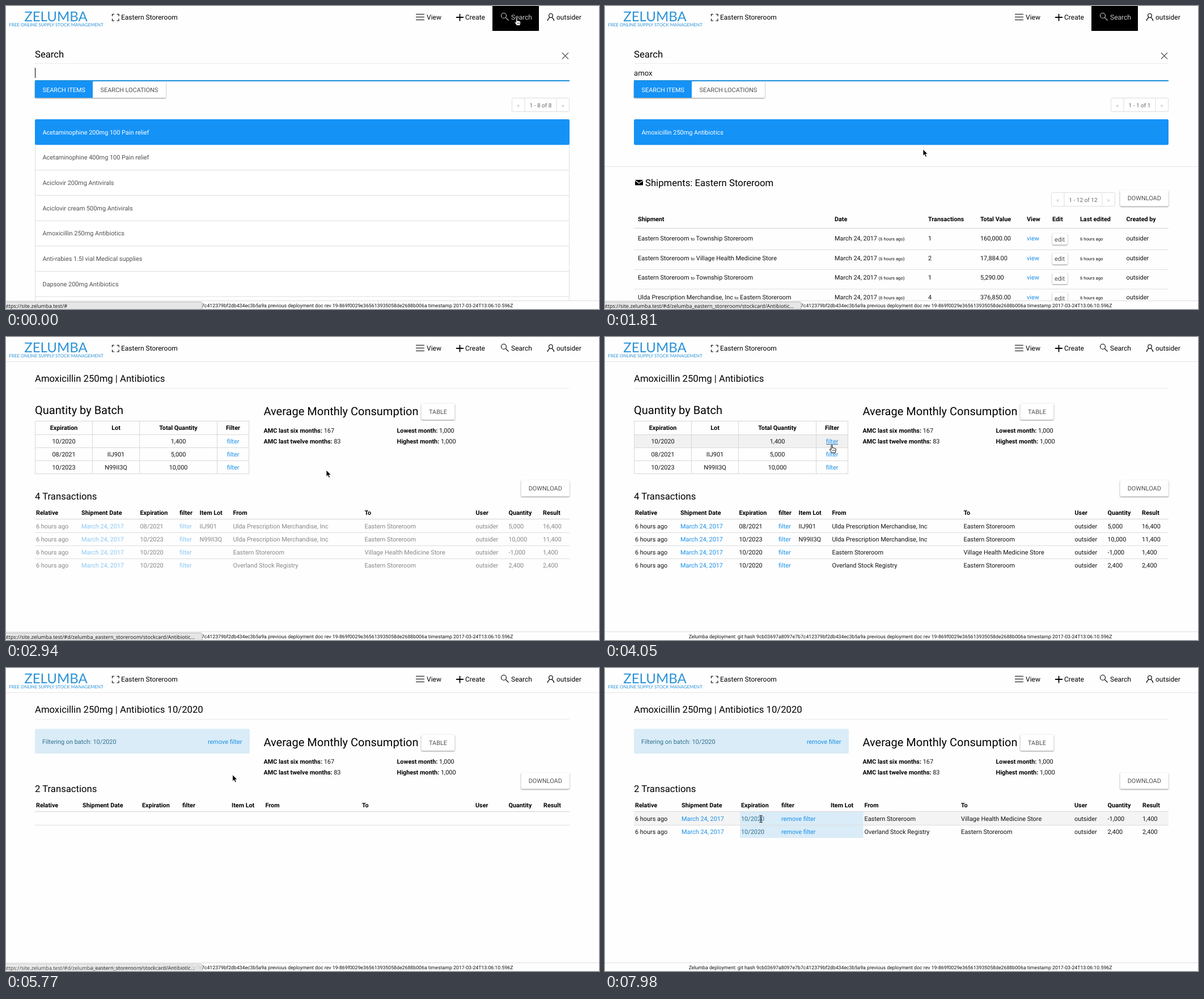
An HTML page that plays this animation: 1046x535 px, repeating every 8 s.

```html
<!DOCTYPE html>
<html lang="en">
<head>
<meta charset="utf-8">
<title>Stock search</title>
<style>
html, body { margin: 0; width: 100%; height: 100%; overflow: hidden; background: #fefefe; }
svg { display: block; font: 10.9px Roboto, sans-serif; fill: #111; text-rendering: geometricPrecision; }
text { white-space: pre; }
.b { font-weight: 700; font-size: 10.8px; fill: #000; }
.nav { font-size: 12px; fill: currentColor; }
.h2 { font-size: 16.7px; fill: #000; }
.h1 { font-size: 20px; fill: #000; }
.s { font-size: 7.7px; }
.page { font-size: 10.1px; fill: #666; }
.link { fill: #1a90e8; }
.grey { fill: #505050; }
.white { fill: #fff; }
.info { fill: #31708f; }
.mid { text-anchor: middle; }
.btn { fill: #fff; filter: drop-shadow(.5px 1px 1.2px rgba(0, 0, 0, .45)); }
.icon { fill: none; stroke: currentColor; stroke-width: 1.15; }
</style>
</head>
<body>
<svg id="stage" width="1046" height="535" viewBox="0 0 1046 535"></svg>
<script>
const BLUE = '#1592f6', STORE = 'Eastern Storeroom', USER = 'outsider';
const CLINIC = 'Village Health Medicine Store', VENDOR = 'Ulda Prescription Merchandise, Inc';
const URL_SHORT = 'https://site.zelumba.test/#';
const URL_LONG = URL_SHORT + 'd/zelumba_eastern_storeroom/stockcard/Antibiotic...';

const text = (x, y, s, cls = '') => `<text x="${x}" y="${y}" class="${cls}">${s}</text>`;
const rect = (x, y, w, h, fill, more = '') =>
  `<rect x="${x}" y="${y}" width="${w}" height="${h}" fill="${fill}" ${more}/>`;
const path = (d, stroke, width = 1) => `<path d="${d}" fill="none" stroke="${stroke}" stroke-width="${width}"/>`;
const hline = (y, color = '#ddd', x0 = 51, x1 = 994, w = 1) => path(`M${x0} ${y}H${x1}`, color, w);
const icon = d => `<path class="icon" d="${d}"/>`;
const group = (id, ...parts) => `<g id="${id}">${parts.join('')}</g>`;
const cells = (xs, y, values, cls = '') => values.map((v, i) => text(xs[i], y, v, cls)).join('');
const link = s => `<tspan class="link">${s}</tspan>`;
const small = s => `<tspan class="s">${s}</tspan>`;
const button = (x, y, w, label) =>
  `<rect class="btn" x="${x}" y="${y}" width="${w}" height="28.5" rx="2"/>` + text(x + w / 2, y + 18.4, label, 'grey mid');

function pager(x, y, inner, label) {
  const a = x + 22.5, b = a + inner;
  return rect(x, y, inner + 45, 24, '#fff', 'stroke="#ddd" rx="2"') + path(`M${a} ${y}v24M${b} ${y}v24`, '#ddd') +
    text(x + 11, y + 16, '«', 'page mid" opacity=".5') + text((a + b) / 2, y + 16.5, label, 'page mid') +
    text(b + 11, y + 16, '»', 'page mid" opacity=".5');
}

function header() {
  return text(88, 27, 'ZELUMBA', 'mid" style="font:24px Lato,sans-serif;fill:#2b93d8') +
    text(88.5, 36, 'FREE ONLINE SUPPLY STOCK MANAGEMENT', 'mid" style="font:7.95px Lato,sans-serif;fill:#2b93d8') +
    icon('M187.5 18V14.5H191M195.5 14.5H199V18M199 22.5V26H195.5M191 26H187.5V22.5') + text(203, 24, STORE, 'nav') +
    icon('M723 14.5H738M723 19.5H738M723 24.5H738') + text(742, 24, 'View', 'nav') +
    path('M800.5 14V26.5M794 20H807', '#000', 1.8) + text(810, 24, 'Create', 'nav') +
    rect(858, 0, 82, 44, '#000', 'id="active"') +
    group('search', icon('M882.5 17a4.5 4.5 0 1 0 -9 0a4.5 4.5 0 1 0 9 0M881.2 20.3L886.5 25.5'),
      text(891, 24, 'Search', 'nav')) +
    icon('M964.3 17a3.3 3.5 0 1 0 -6.6 0a3.3 3.5 0 1 0 6.6 0M955.3 26.3C955.3 22.5 958 21.2 959.3 20.2M962.7 20.2C964 21.2 966.7 22.5 966.7 26.3') +
    text(971, 24, USER, 'nav');
}

function dialog() {
  return text(51, 90.5, 'Search', 'h2') + path('M981 82.5L992 93.5M992 82.5L981 93.5', '#666', 1.5) +
    hline(101.5, '#eaeaea') + text(51, 123, '', '" id="typed" style="font-size:13.2px') +
    rect(51, 109, 1, 18, '#000', 'id="caret"') +
    `<rect class="btn" x="51" y="133" width="231" height="29" rx="2"/>` + rect(51, 133, 102, 29, BLUE) +
    hline(132, '#1a8fdc', 51, 994, 2) +
    text(64.5, 151.5, 'SEARCH ITEMS', 'white') + text(166.5, 151.5, 'SEARCH LOCATIONS', 'grey');
}

function itemList(names) {
  const step = 44.65;
  return rect(51.5, 200.5, 942, step * names.length, '#fff', 'stroke="#ddd" rx="3"') +
    rect(51, 200, 943, 45.3, BLUE, 'rx="2.5"') +
    names.map((n, i) => (i ? hline(245.2 + step * i, '#ddd') : '') +
      text(64.5, 226.8 + step * i, n, i ? 'grey' : 'white')).join('');
}

function shipments() {
  const xs = [58, 405, 570, 662, 744, 789, 838, 919.5];
  const to = (a, b) => `${a} ${small('to')} ${b}`;
  const rows = [[to(STORE, 'Township Storeroom'), 1, '160,000.00'], [to(STORE, CLINIC), 2, '17,884.00'],
    [to(STORE, 'Township Storeroom'), 1, '5,290.00'], [to(VENDOR, STORE), 4, '376,850.00']];
  return hline(283.5, '#e6e6e6', 0, 1046) + rect(53, 307, 14, 9.5, '#000', 'rx="1"') +
    path('M53 308L60 313L67 308', '#fff', 1.2) + text(71, 318, 'Shipments: ' + STORE, 'h2') +
    pager(787.5, 329.5, 67, '1 - 12 of 12') + button(908.5, 325, 85.5, 'DOWNLOAD') +
    cells(xs, 380, ['Shipment', 'Date', 'Transactions', 'Total Value', 'View', 'Edit', 'Last edited', 'Created by'], 'b') +
    hline(392.5, '#ddd', 51, 994, 1.5) +
    rows.map(([what, count, value], i) => {
      const y = 414 + 34.7 * i;
      return cells(xs, y, [what, 'March 24, 2017 ' + small('(6 hours ago)'), count, value, link('view'), '',
        small('6 hours ago'), USER]) + hline(y + 16.5) +
        `<rect class="btn" x="789" y="${y - 12.5}" width="27" height="20" rx="2"/>` + text(802, y + 1.5, 'edit', 'grey mid');
    }).join('');
}

function consumption() {
  const fact = (x, y, label, value) => text(x, y, `<tspan class="b">${label}:</tspan> ${value}`);
  return hline(43.5, '#e4e4e4', 0, 1046) + hline(90.5, '#eaeaea') +
    text(454.5, 138, 'Average Monthly Consumption', 'h1') + button(732.5, 117.5, 59, 'TABLE') +
    fact(454.5, 169, 'AMC last six months', 167) + fact(454.5, 188, 'AMC last twelve months', 83) +
    fact(689.5, 169, 'Lowest month', '1,000') + fact(689.5, 188, 'Highest month', '1,000');
}

function batches() {
  const xs = [102, 194, 304, 400.5];
  const rows = [['10/2020', '', '1,400'], ['08/2021', 'IIJ901', '5,000'], ['10/2023', 'N99II3Q', '10,000']];
  return text(51, 136, 'Quantity by Batch', 'h1') + rect(52, 173, 377, 22, '#f1f1f1', 'id="hover"') +
    rect(51.5, 148.5, 377, 93, 'none', 'stroke="#d8d8d8"') +
    path('M152.5 148.5V241.5M235.5 148.5V241.5M372.5 148.5V241.5M51 172.5H429M51 195.5H429M51 218.5H429', '#d8d8d8') +
    cells(xs, 164, ['Expiration', 'Lot', 'Total Quantity', 'Filter'], 'b mid') +
    rows.map((r, i) => cells(xs, 188 + 23 * i, [...r, link('filter')], 'mid')).join('') +
    group('underline', hline(189.5, '#1a70b8', 390, 411));
}

function transactions(id, y, xs, rows, backdrop = '') {
  const heads = ['Relative', 'Shipment Date', 'Expiration', 'filter', 'Item Lot', 'From', 'To', 'User', 'Quantity', 'Result'];
  return text(51, y - 26.7, rows.length + ' Transactions', 'h2') + button(908.5, y - 61, 85.5, 'DOWNLOAD') +
    cells(xs, y, heads, 'b') + hline(y + 7.5, '#ddd', 51, 994, 1.5) +
    group(id, backdrop, ...rows.map(([expires, action, lot, from, to, quantity, result], i) =>
      cells(xs, y + 24 + 23 * i, ['6 hours ago', link('March 24, 2017'), expires, link(action), lot, from, to, USER, quantity, result]))) +
    rows.slice(1).map((_, i) => hline(y + 31.5 + 23 * i)).join('');
}

const out = [CLINIC, '-1,000', '1,400'], stocked = [STORE, '2,400', '2,400'], supplier = 'Overland Stock Registry';
const lastRows = (date, action) => [[date, action, '', STORE, ...out], [date, action, '', supplier, ...stocked]];
const title = s => text(51, 78.8, 'Amoxicillin 250mg | Antibiotics' + s, 'h2');
const infoDate = '<tspan class="info">10/2020</tspan>';

stage.innerHTML = header() +
  group('searching',
    group('allItems', pager(892.5, 162.5, 56, '1 - 8 of 8'), itemList([
      'Acetaminophine 200mg 100 Pain relief', 'Acetaminophine 400mg 100 Pain relief', 'Aciclovir 200mg Antivirals',
      'Aciclovir cream 500mg Antivirals', 'Amoxicillin 250mg Antibiotics', 'Anti-rabies 1.5l vial Medical supplies',
      'Dapsone 200mg Antibiotics', ''])),
    group('oneItem', pager(892.5, 162.5, 56, '1 - 1 of 1'), itemList(['Amoxicillin 250mg Antibiotics']), shipments()),
    dialog()) +
  group('stock', consumption(),
    group('unfiltered', title(''), batches(),
      transactions('rowsAll', 314, [53, 133, 236.5, 306, 341.5, 400.5, 632.5, 828.5, 886.5, 947], [
        ['08/2021', 'filter', 'IIJ901', VENDOR, STORE, '5,000', '16,400'],
        ['10/2023', 'filter', 'N99II3Q', VENDOR, STORE, '10,000', '11,400'], ...lastRows('10/2020', 'filter')])),
    group('filtered', title(' 10/2020'), rect(51, 107.5, 379, 43.5, '#d9ecf7', 'rx="2"'),
      text(64, 133.5, 'Filtering on batch: 10/2020', 'info'), text(356, 133.5, 'remove filter', 'link'),
      transactions('rowsBatch', 246, [53, 135, 240, 311, 398, 457.5, 628, 828, 886.5, 948],
        lastRows(infoDate, 'remove filter'), rect(51, 254, 943, 23, '#f4f4f4') + rect(238, 254, 217.5, 46, '#d9ecf7')))) +
  rect(0, 520, 1046, 15, '#fefefe') + hline(520.5, '#ddd', 0, 1046) +
  text(894.5, 532, 'Zelumba deployment: git hash 9cb03697a8097e7b7c412379bf2db434ec3b5a9a previous deployment doc rev ' +
    '19-869f0029e365613935058de2688b006a timestamp 2017-03-24T13:06:10.596Z', '" text-anchor="end" font-size="8.75') +
  group('status', rect(-4, 522.5, 350, 16, '#e6e6e6', 'stroke="#b8b8b8" rx="2.5"'),
    text(-4, 532.5, '', '" id="address" style="font:9.1px Open Sans,sans-serif;fill:#111')) +
  group('cursor',
    group('arrow', '<path d="M0 0V11.5L2.6 9.1L4.5 13.5L6.5 12.6L4.7 8.4H8.2Z" fill="#000" stroke="#fff" stroke-width=".8"/>'),
    group('hand', '<path d="M-1 3Q0 1.4 1.2 3V7.5Q2.4 6.5 3.4 7.8Q4.7 7 5.4 8.3Q7.3 7.8 7.3 10Q7.3 13 6 16H.2Q-1 13.5 -3.3 11Q-4 9 -2.4 9.3L-1 10.6Z" fill="#fff" stroke="#000"/>' +
      path('M1.6 10.5V13.5M3.4 10.5V13.5M5.1 10.5V13.5', '#000', .6)),
    group('beam', path('M-2.8 -6.2Q0 -6.2 0 -4.7Q0 -6.2 2.8 -6.2M0 -5V5M-2.8 6.2Q0 6.2 0 4.7Q0 6.2 2.8 6.2M-1.5 1.5H1.5', '#222', 1.1)));

const el = id => document.getElementById(id);
const show = (id, on) => { el(id).style.display = on ? '' : 'none'; };
// Value of the latest [time, value] pair that has been reached.
const hold = (t, keys) => keys.filter(k => k[0] <= t).pop()[1];

// Pointer moves: start, end, number of steps, target x, target y.
const moves = [[1520, 1810, 4, 561, 253], [1910, 2200, 4, 565, 235], [3400, 4160, 8, 399.7, 188.5],
  [6460, 6820, 5, 274.5, 261], [7440, 7530, 2, 274.5, 265.5], [7980, 7980, 1, 275, 266.5]];
function pointer(t) {
  let x = 900.5, y = 18.5;
  for (const [start, end, steps, tx, ty] of moves) {
    if (t < start) break;
    const done = t >= end ? steps : 1 + Math.floor((t - start) / (end - start) * (steps - 1) + .05);
    const k = 1 - (1 - done / steps) ** 3;
    x += (tx - x) * k;
    y += (ty - y) * k;
  }
  return [x, y];
}

function draw() {
  const t = performance.now() % 8000;
  const inSearch = t < 2520, isFiltered = t >= 5500;
  show('searching', inSearch);
  show('active', inSearch);
  el('search').style.color = inSearch ? '#c8c8c8' : '#000';
  show('allItems', t < 905);
  show('oneItem', t >= 905);
  show('stock', !inSearch);
  show('unfiltered', !isFiltered);
  show('filtered', isFiltered);

  if (inSearch) {
    el('typed').textContent = hold(t, [[0, ''], [620, 'a'], [800, 'am'], [905, 'amo'], [1010, 'amox']]);
    el('caret').setAttribute('x', 51 + el('typed').getComputedTextLength());
    show('caret', hold(t, [[0, 1], [360, 0], [620, 1], [1520, 0], [2000, 1]]));
  }
  show('hover', t >= 3940);
  el('hover').setAttribute('height', t < 4160 ? 22 : 6);
  show('underline', t >= 3940);
  el('rowsAll').style.opacity = hold(t, [[0, 0], [2940, .5], [3080, .8], [3200, 1]]);
  el('rowsBatch').style.opacity = hold(t, [[0, 0], [5890, .35], [6070, .75], [6220, 1]]);

  el('address').textContent = t < 1720 ? URL_SHORT : URL_LONG;
  el('status').style.opacity = hold(t, [[0, 1], [3400, .7], [3510, .3], [3620, 0], [4250, 1], [5770, .8], [5890, .35], [6070, 0]]);

  const shape = hold(t, [[0, 'hand'], [1520, 'arrow'], [2000, 'hand'], [2520, 'arrow'], [3940, 'hand'], [5350, 'arrow'], [6730, 'beam']]);
  for (const id of ['arrow', 'hand', 'beam']) show(id, id === shape);
  el('cursor').setAttribute('transform', `translate(${pointer(t)})`);
  requestAnimationFrame(draw);
}
draw();
</script>
</body>
</html>
```
